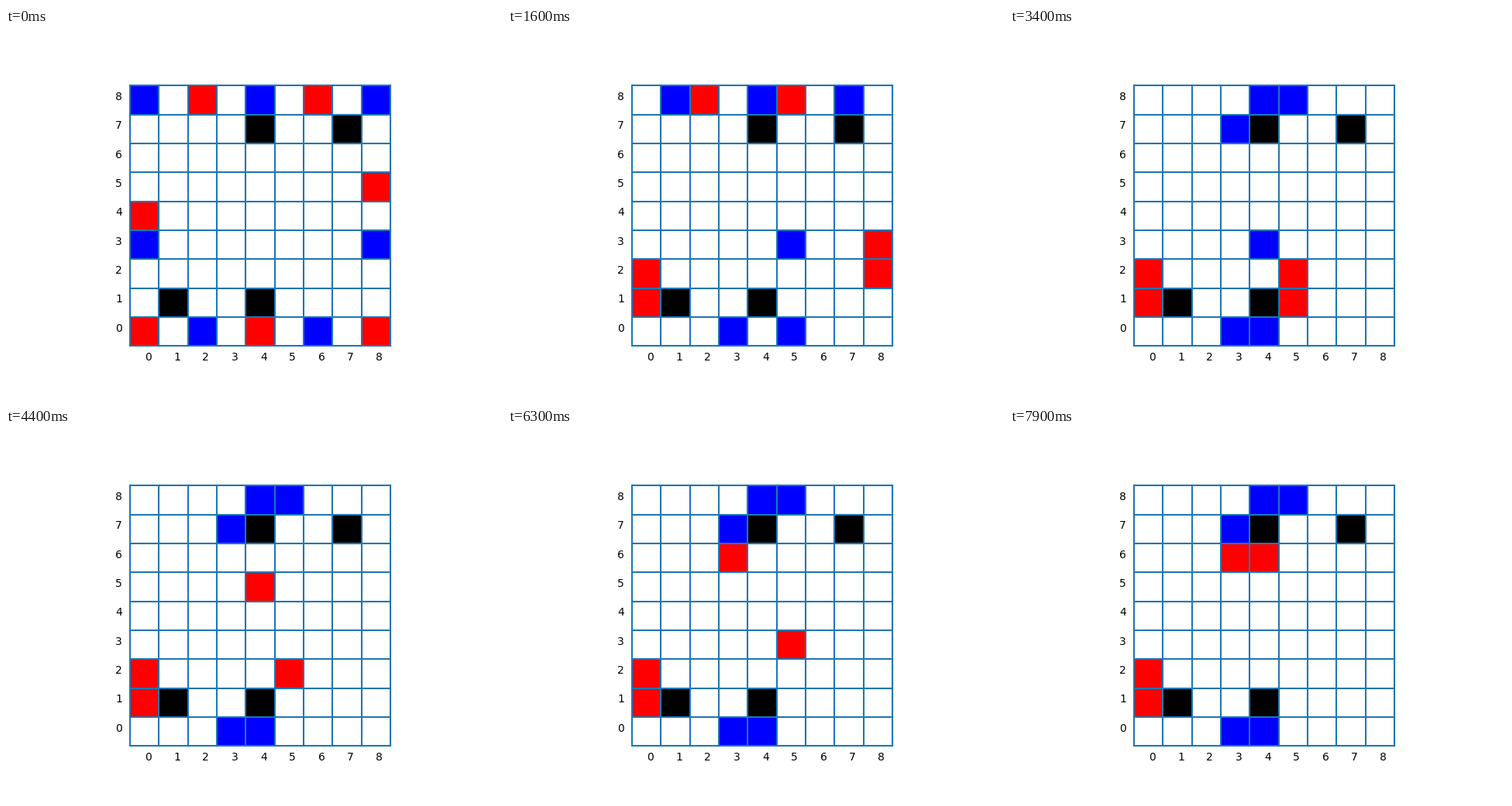
Write a matplotlib script that moves like this. It is 640 px wide and 480 px high and loops after 8 s.

```python
import matplotlib.pyplot as plt
from matplotlib.animation import FuncAnimation
from matplotlib.patches import Rectangle

SIZE = 9
FRAMES, INTERVAL = 80, 100
STEP = {"L": (-1, 0), "R": (1, 0), "U": (0, 1), "D": (0, -1)}

START = {
    "blue": "08 48 88 83 03 20 60",
    "red": "28 68 85 04 00 40 80",
    "black": "47 77 11 41",
}

# Each word is a cell (column, row) followed by the steps its piece takes.
TURNS = {
    "blue": "20R 60L 83LLL 03D 08R 88L 48L 78LL 18RDR 38R 53L 50L 30UD 43R "
            "37LRLRUD 30" + "UD" * 7,
    "red": "85D 80UU 84D 00U 04DD 68LL 82DL 83DL 72LL 71LL 52UU 51U 54LU "
           "45UL 52UL 36RL 43R 36RLRLRL 53LUUU",
}


def cell(word):
    return int(word[0]), int(word[1])


def moves(script):
    """Yield (from, to) for every single step."""
    for word in script.split():
        x, y = cell(word)
        for key in word[2:]:
            dx, dy = STEP[key]
            yield (x, y), (x + dx, y + dy)
            x, y = x + dx, y + dy


def play(board, old, new):
    """Move a piece and remove rivals caught between two of its team."""
    board = dict(board)
    team = board.pop(old)
    board[new] = team
    rival = "red" if team == "blue" else "blue"
    x, y = new
    for dx, dy in STEP.values():
        near, far = (x + dx, y + dy), (x + 2 * dx, y + 2 * dy)
        if board.get(near) == rival and board.get(far) == team:
            del board[near]
    return board


def all_boards():
    board = {cell(w): color for color, words in START.items() for w in words.split()}
    turns = {team: moves(script) for team, script in TURNS.items()}
    boards = [board]
    for n in range(1, FRAMES):
        board = play(board, *next(turns["blue" if n % 2 else "red"]))
        boards.append(board)
    return boards


boards = all_boards()

fig, ax = plt.subplots(figsize=(6.4, 4.8), dpi=100)
ax.set_aspect("equal")
ax.set(xlim=(-0.45, 9.45), ylim=(-0.45, 9.45))
ax.axis("off")

for i in range(SIZE + 1):
    ax.plot([0, SIZE], [i, i], color="C0", lw=1.5)
    ax.plot([i, i], [0, SIZE], color="C0", lw=1.5)
for i in range(SIZE):
    ax.text(i + 0.5, -0.5, str(i), fontsize=10, family="DejaVu Sans")
    ax.text(-0.5, i + 0.5, str(i), fontsize=10, family="DejaVu Sans")

squares = {}
for x in range(SIZE):
    for y in range(SIZE):
        squares[x, y] = ax.add_patch(Rectangle((x, y), 1, 1, lw=0, visible=False))


def draw(n):
    for pos, square in squares.items():
        color = boards[n].get(pos)
        square.set_visible(color is not None)
        if color:
            square.set_facecolor(color)
    return list(squares.values())


anim = FuncAnimation(fig, draw, frames=FRAMES, interval=INTERVAL,
                     repeat=True, repeat_delay=0)
plt.show()
```
